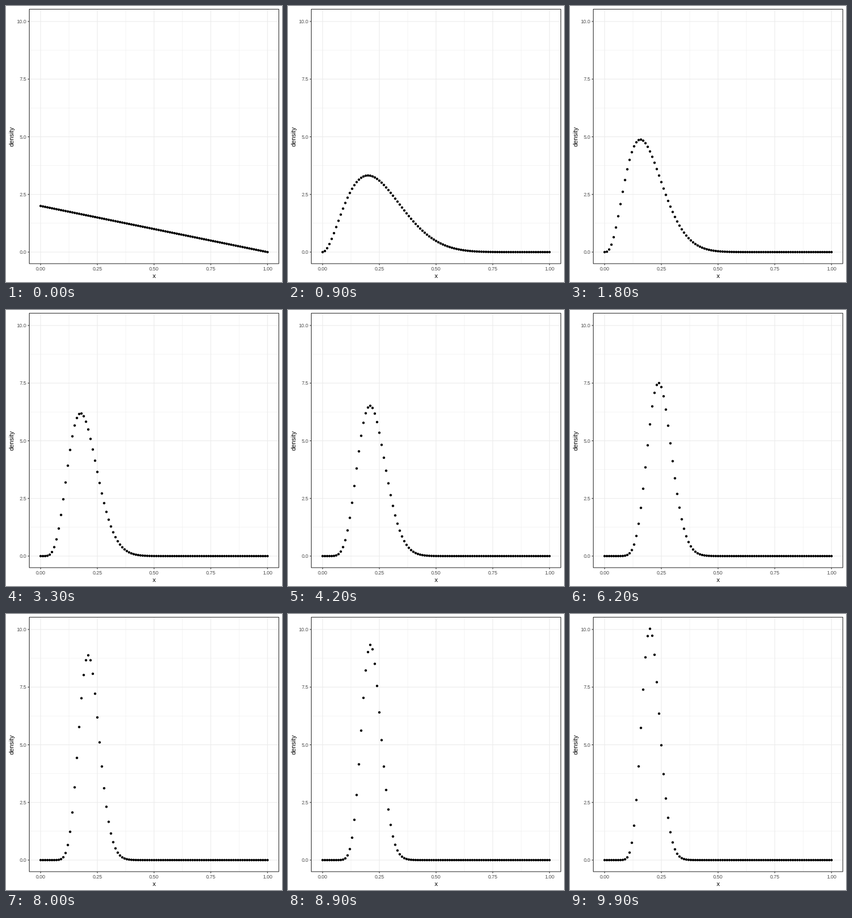
Write a matplotlib script that moves like this. It is 480x480 px and loops after 10000 ms.

```python
from math import comb

import matplotlib.pyplot as plt
import numpy as np
from matplotlib.animation import FuncAnimation
from matplotlib.patches import Rectangle

SIZE = 480
FRAMES = 100
LEFT, RIGHT, TOP, BOTTOM = 40.5, 474.5, 5.6, 448.1
PEAK = 10.0293  # highest density reached, sets the vertical scale

GRID, DARK, LABEL = "#ebebeb", "#333333", "#4d4d4d"

# Trials that succeed; every other trial fails.
HITS = np.array([3, 6, 17, 24, 25, 34, 37, 42, 43, 45,
                 49, 51, 52, 53, 54, 64, 68, 82, 84, 93])

plt.rcParams["font.family"] = "Liberation Sans"


def px(x):
    """Horizontal pixel of a data value, with 5 % padding on each side."""
    return LEFT + (RIGHT - LEFT) * (x + 0.05) / 1.1


def py(y):
    return BOTTOM - (BOTTOM - TOP) * (y / PEAK + 0.05) / 1.1


def posterior(n, x):
    """Beta density after n trials, starting from a flat prior."""
    s = int(np.sum(HITS <= n))
    return (n + 1) * comb(n, s) * x**s * (1 - x) ** (n - s)


fig = plt.figure(figsize=(SIZE / 72, SIZE / 72), dpi=72, facecolor="white")
ax = fig.add_axes([0, 0, 1, 1])
ax.set_xlim(0, SIZE)
ax.set_ylim(SIZE, 0)
ax.axis("off")


def line(xs, ys, color, width, z):
    ax.plot(xs, ys, color=color, lw=width, zorder=z, snap=False,
            solid_capstyle="butt")


def grid(xs, ys, width, z):
    for x in xs:
        line([px(x)] * 2, [TOP, BOTTOM], GRID, width, z)
    for y in ys:
        line([LEFT, RIGHT], [py(y)] * 2, GRID, width, z)


x_ticks = np.linspace(0, 1, 5)
y_ticks = np.linspace(0, 10, 5)
grid(x_ticks[:-1] + 0.125, y_ticks[:-1] + 1.25, 0.53, 1)
grid(x_ticks, y_ticks, 1.07, 2)

ax.add_patch(Rectangle((LEFT, TOP), RIGHT - LEFT, BOTTOM - TOP, fill=False,
                       ec=DARK, lw=1.07, zorder=4, snap=False))

for v in x_ticks:
    line([px(v)] * 2, [BOTTOM, BOTTOM + 2.74], DARK, 1.07, 5)
    ax.text(px(v), 460, f"{v:.2f}", size=8.8, color=LABEL, ha="center",
            va="baseline")
for v in y_ticks:
    line([LEFT - 2.74, LEFT], [py(v)] * 2, DARK, 1.07, 5)
    ax.text(35.6, py(v) + 3.1, f"{v:.1f}", size=8.8, color=LABEL, ha="right",
            va="baseline")

ax.text((LEFT + RIGHT) / 2, 472.8, "x", size=11, ha="center", va="baseline")
ax.text(13.4, (TOP + BOTTOM) / 2, "density", size=11, rotation=90,
        rotation_mode="anchor", ha="center", va="baseline")

grid_x = np.linspace(0, 1, 101)
# One colour per dot keeps sub-pixel placement.
dots = ax.scatter(px(grid_x), px(grid_x), s=4.26**2, c=["black"] * 101,
                  linewidths=0, zorder=3, snap=False)


def draw(i):
    y = posterior(i + 1, grid_x)
    dots.set_offsets(np.column_stack([px(grid_x), py(y)]))
    return (dots,)


anim = FuncAnimation(fig, draw, frames=FRAMES, interval=100, repeat=True,
                     repeat_delay=0, blit=False)
plt.show()
```
